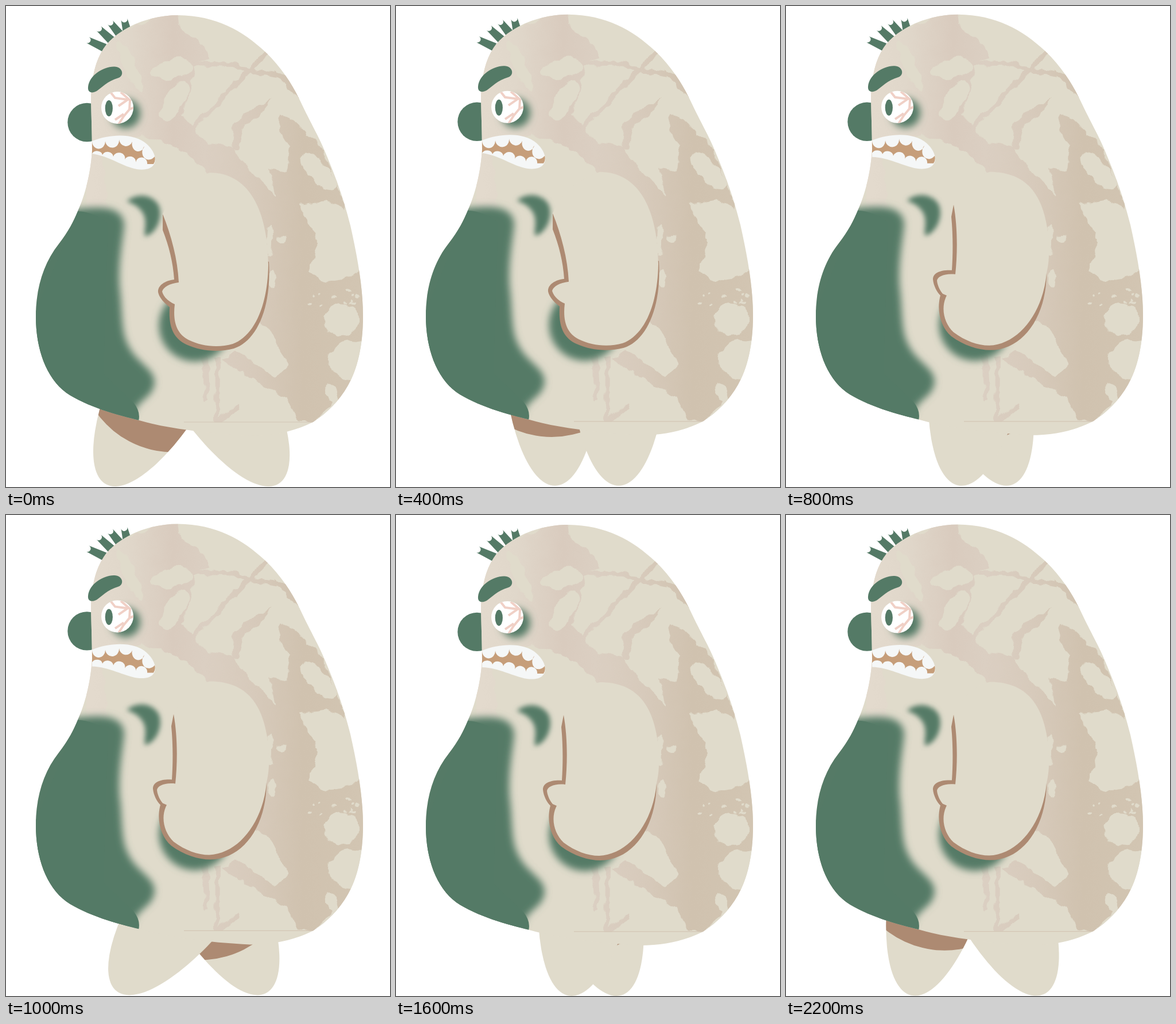
An HTML page that plays this animation: 669 px wide and 837 px high, repeating every 2.4 s.

```html
<!DOCTYPE html>
<html lang="en">
<head>
<meta charset="utf-8">
<title>Walking creature</title>
<style>
  html, body { margin: 0; width: 100%; height: 100%; overflow: hidden; background: #fff; }
  svg { display: block; width: 100%; height: 100%; }
  .skin { fill: #e0dbcb; }
  .green { fill: #547a66; }
  .brown { fill: #ad8a72; }
</style>
</head>
<body>
<svg viewBox="0 0 669 837">
  <defs>
    <linearGradient id="stone" gradientUnits="userSpaceOnUse" x1="150" y1="0" x2="620" y2="0">
      <stop offset="0" stop-color="#e3dacd"/>
      <stop offset=".13" stop-color="#e0d7ca"/>
      <stop offset=".3" stop-color="#d9cbbe"/>
      <stop offset=".42" stop-color="#dbcfc2"/>
      <stop offset=".6" stop-color="#d7cabb"/>
      <stop offset=".78" stop-color="#d0c2af"/>
      <stop offset="1" stop-color="#d2c5b2"/>
    </linearGradient>
    <path id="body" d="M300 16C366 17 411 42 452 80C482 109 500 139 513 166C532 206 545 227 556 254
      C575 299 588 334 600 382C613 440 622 492 622 540C622 592 612 632 596 660C580 688 560 708 535 724
      C505 739 470 748 425 748C390 746 350 743 318 738C288 734 260 729 232 721C195 712 140 697 105 673
      C70 647 52 597 52 540C52 492 65 448 92 414C109 392 118 374 125 357C138 329 148 289 150 250
      C150 225 149 205 148 160C150 120 156 96 170 74C195 38 248 16 300 16Z"/>
    <clipPath id="inBody"><use href="#body"/></clipPath>
    <clipPath id="aboveHem"><rect width="669" height="724.5"/></clipPath>
    <clipPath id="inLeg"><ellipse rx="86" ry="250"/></clipPath>
    <clipPath id="inEye"><circle cx="194" cy="177" r="28"/></clipPath>
    <filter id="soft7" x="-30%" y="-30%" width="160%" height="160%"><feGaussianBlur stdDeviation="6.5"/></filter>
    <filter id="soft4" x="-30%" y="-30%" width="160%" height="160%"><feGaussianBlur stdDeviation="4"/></filter>
    <filter id="ragged" filterUnits="userSpaceOnUse" x="140" y="0" width="500" height="740" color-interpolation-filters="sRGB">
      <feTurbulence type="fractalNoise" baseFrequency=".055" numOctaves="2" seed="4"/>
      <feDisplacementMap in="SourceGraphic" scale="13" xChannelSelector="R" yChannelSelector="G"/>
    </filter>
  </defs>
  <g id="creature">
    <g id="farLeg"><ellipse class="skin" rx="86" ry="250"/><circle class="brown" r="165" clip-path="url(#inLeg)"/></g>
    <g id="nearLeg"><ellipse class="skin" rx="86" ry="250"/></g>
    <g id="hair" class="green"></g>
    <circle class="green" cx="141" cy="202.5" r="33.7"/>
    <use href="#body" class="skin"/>
    <g clip-path="url(#inBody)">
      <g clip-path="url(#aboveHem)" filter="url(#ragged)">
        <g fill="url(#stone)">
          <path d="M298 0L301 34L345 70L356 92L330 98L320 155L306 190L330 216L354 290L299 245L235 222L168 260L180 380H110L130 80Z"/>
          <path d="M325 212L352 238L392 246L440 300L470 334L457 283L490 288L494 246L476 214L478 188L500 198L552 246L592 354
            L560 340L511 346L526 378L545 410L528 462Q560 495 616 462L650 500V620L536 724H512L488 682L436 652L376 616L400 600
            L470 648L492 622L455 555L430 548L440 400L354 290Z"/>
          <path d="M392 250L396 208L420 185L462 163L440 190L414 212L406 250ZM468 112L500 122L530 175L490 145Z"/>
        </g>
        <g fill="none" stroke="url(#stone)" stroke-width="8">
          <path d="M320 218L412 125L456 79M324 100L395 102L420 112L474 120"/>
          <path d="M346 612L350 690M369 612L368 722L406 698"/>
        </g>
        <g id="cells" class="skin"></g>
      </g>
      <path d="M310 724H535" stroke="#d3c6b5" stroke-width="1.2"/>
      <path class="green" filter="url(#soft7)" d="M20 353L125 353C155 350 205 344 206 382C203 410 195 450 198 490
        C203 525 200 565 212 588C225 620 259 630 259 655C256 682 234 682 224 706L200 760H20Z"/>
      <path class="green" d="M125 357Q155 359 178 378L170 640L222 690Q235 706 231 722L100 730L40 560Z"/>
      <path class="green" filter="url(#soft4)" d="M210 340C226 326 252 326 265 345C275 362 265 396 242 401
        C240 392 245 380 241 366C236 352 223 344 210 340Z"/>
      <circle class="green" filter="url(#soft7)" cx="329" cy="556" r="62.5"/>
      <circle class="green" filter="url(#soft7)" cx="208" cy="187" r="26"/>
    </g>
    <g id="armForward">
      <path class="brown" d="M273 362L273 390C284 418 291 446 293 476C276 478 264 487 265 498C267 508 276 517 285 524
        C283 560 292 578 314 589C340 601 370 603 397 596C435 584 463 528 458 445L300 400Z"/>
      <path class="skin" d="M273 362C288 400 299 440 301 481C285 483 274 489 272 497C275 507 283 514 294 519
        C290 552 299 571 318 581C342 593 371 595 395 588C431 575 456 524 457 450C456 350 420 290 355 290C325 300 290 320 273 362Z"/>
    </g>
    <g id="armBack">
      <path class="brown" d="M292 347L288 368C291 400 291 430 289 461C268 460 256 466 256 477C257 488 263 499 269 505
        C262 530 269 560 288 576C310 592 335 600 356 600C414 600 455 540 454 462L400 420Z"/>
      <path class="skin" d="M292 347C299 385 299 430 295 468C276 466 264 472 263 479C264 489 269 497 273 502L280 505
        C269 526 275 553 292 569C312 584 334 592 354 592C406 590 448 534 454 466C460 440 458 420 457 400
        C449 330 420 290 355 290C335 294 310 310 292 347Z"/>
    </g>
    <path class="green" d="M143 141C145 121 168 106 188 105.5C203 105 207 121 196 125C176 131 167 142 158 148C149 153 142 150 143 141Z"/>
    <circle cx="194" cy="177" r="28" fill="#fff"/>
    <path clip-path="url(#inEye)" fill="none" stroke="#f0d0c6" stroke-width="4"
      d="M182 150L190 160L212 163L196 174M200 150L216 164L215 180L205 192L196 206M205 188L190 198M215 180L224 176"/>
    <ellipse class="green" cx="179.3" cy="178" rx="6.6" ry="14"/>
    <path id="teeth" fill="#f5f7f7"/>
    <path fill="#c69e7a" d="M150 236A11.5 13 0 0 0 173 235A12 13 0 0 0 197 232A12 13 0 0 0 220 236A11 13 0 0 0 241 244
      A11 13 20 0 0 259 262Q261 269 257 275H246A10 10 0 0 0 226 272A10 9 0 0 0 207 267A10 9 0 0 0 187 262A10 9 0 0 0 168 259
      A9.5 8 0 0 0 150 257Z"/>
  </g>
</svg>
<script>
const $ = id => document.getElementById(id);
const STEP = 200, LOOP = 2400, GROUND = 836;
const LEG_WIDTH = 86, LEG_LENGTH = 250;

// Four tufts that widen from a round tip towards the scalp.
function tuft([x, y], [rootX, rootY]) {
  const length = Math.hypot(rootX - x, rootY - y);
  const nx = (y - rootY) / length, ny = (rootX - x) / length;
  const corner = (px, py, w) => `${px + nx * w} ${py + ny * w}`;
  return `<path d="M${corner(x, y, 5.6)}L${corner(rootX, rootY, 7.5)}L${corner(rootX, rootY, -7.5)}L${corner(x, y, -5.6)}
    A5.6 5.6 0 0 1 ${corner(x, y, 5.6)}Z"/>`;
}
$('hair').innerHTML = tuft([142, 59], [172, 73]) + tuft([161.5, 39], [184, 60]) +
  tuft([181.5, 28.5], [199, 50]) + tuft([206, 23], [211, 44]);

// Pale islands in the stone pattern.
const cell = (x, y, rx, ry, tilt = 0) =>
  `<ellipse rx="${rx}" ry="${ry}" transform="translate(${x} ${y}) rotate(${tilt})"/>`;

// Small chips strewn along the flank.
function chips() {
  const random = i => { const v = Math.sin(i * 91.7) * 4375.5; return v - Math.floor(v); };
  return Array.from({ length: 16 }, (_, i) =>
    cell(490 + 125 * Math.sqrt(random(i + 1)), 522 - 34 * random(i + 30), 1.5 + 2.5 * random(i + 60), 2)).join('');
}
$('cells').innerHTML = chips() +
  cell(217, 105, 11, 46, -25) + cell(290, 109, 38, 17, -12) + cell(294, 165, 38, 17, -58) +
  cell(544, 288, 42, 17, 46) + cell(585, 546, 30, 28) + cell(602, 616, 40, 34) +
  cell(568, 676, 9, 20, -25) + cell(464, 474, 7, 15) + cell(481, 404, 10, 6) + cell(460, 410, 5, 28);

// Leg poses by time from mid-loop: far foot x and tilt, near foot x and tilt.
const strides = [
  { at: 200, legs: [438, 27, 215, -36.5] },
  { at: 600, legs: [330, 4, 397, 18] },
  { at: 800, legs: [277, 1.5, 388, 0] },
  { at: 1000, legs: [225, -13.5, 436, 24.5] },
  { at: 1200, legs: [190, -28, 457, 31] }
];

function legsAt(time) {
  const away = Math.max(strides[0].at, Math.abs(time - LOOP / 2));
  const next = Math.max(1, strides.findIndex(s => s.at >= away));
  const a = strides[next - 1], b = strides[next];
  const k = (away - a.at) / (b.at - a.at);
  return a.legs.map((v, i) => v + (b.legs[i] - v) * k);
}

// Places a tilted ellipse so that its lowest point rests on the ground at x.
function placeLeg(id, x, tilt) {
  const s = Math.sin(tilt * Math.PI / 180), c = Math.cos(tilt * Math.PI / 180);
  const reach = Math.hypot(LEG_LENGTH * c, LEG_WIDTH * s);
  const shift = (LEG_LENGTH ** 2 - LEG_WIDTH ** 2) * s * c / reach;
  $(id).setAttribute('transform', `translate(${x - shift} ${GROUND - reach}) rotate(${-tilt})`);
}

function draw(elapsed) {
  const time = Math.floor((elapsed % LOOP) / STEP) * STEP;
  const forward = time < LOOP / 4;
  const wave = Math.sin(2 * Math.PI * time / LOOP);
  const lift = -4.3 * wave ** 24 - 1.2 * wave;
  const [farX, farTilt, nearX, nearTilt] = legsAt(time);
  $('creature').setAttribute('transform', `translate(0 ${lift})`);
  placeLeg('farLeg', farX, farTilt);
  placeLeg('nearLeg', nearX, nearTilt);
  $('armForward').style.display = forward ? '' : 'none';
  $('armBack').style.display = forward ? 'none' : '';
  $('teeth').setAttribute('d', `M150 235C182 222 224 221 245 240C256 250 262 262 259 273
    C255 284 241 286 228 284C204 280 180 ${forward ? 261 : 265} 150 ${forward ? 257 : 264}Z`);
}

const start = performance.now();
function tick() {
  draw(performance.now() - start);
  requestAnimationFrame(tick);
}
tick();
</script>
</body>
</html>
```
